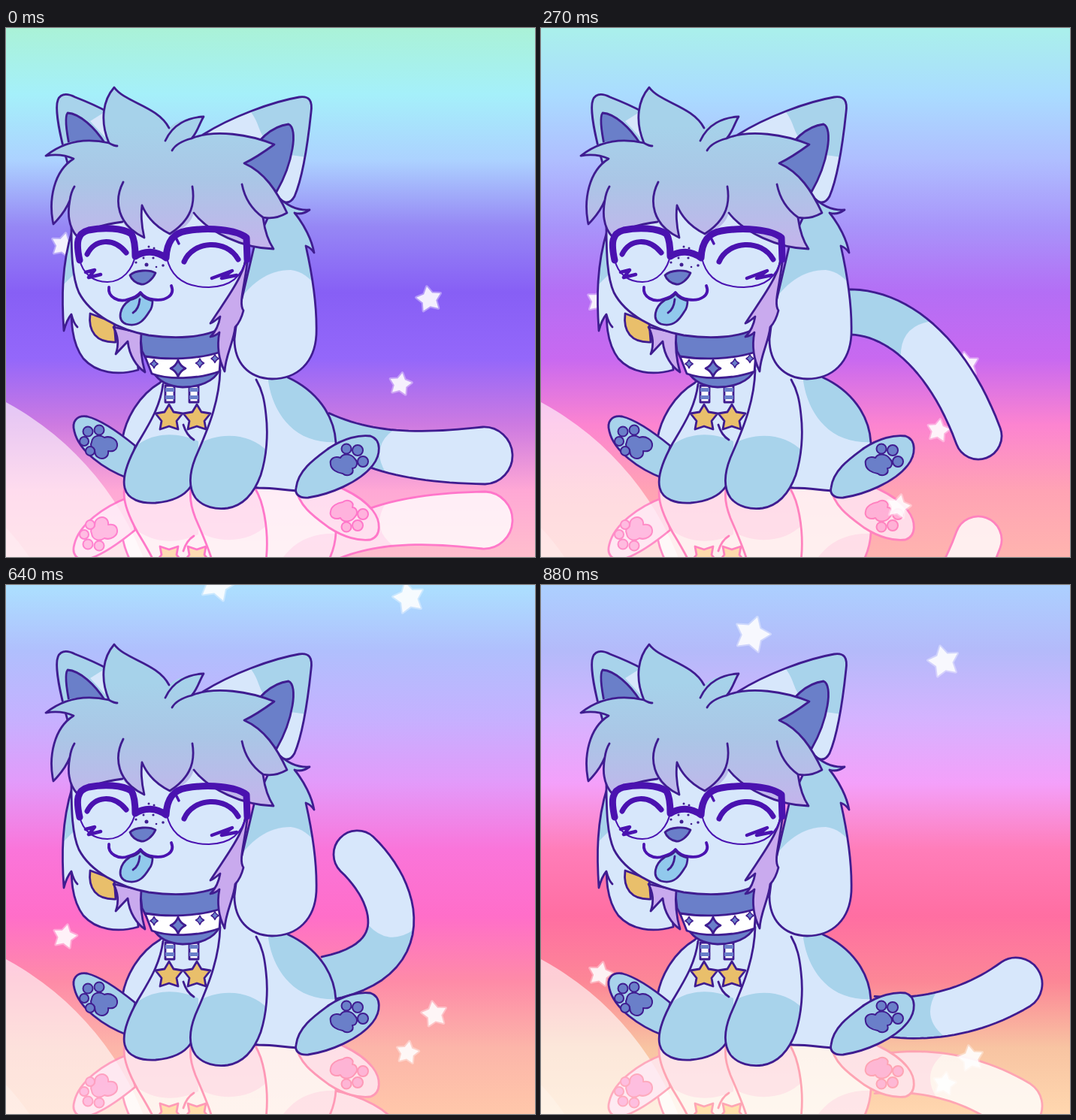
Animation, 704 px wide and 704 px high, one loop 910 ms. Source, as an HTML page:

```html
<!DOCTYPE html>
<html lang="en">
<head>
<meta charset="utf-8">
<title>Wagging tail</title>
<style>
  html, body { margin: 0; width: 100%; height: 100%; overflow: hidden; }
  svg { display: block; width: 100vw; height: 100vh; }
  #scene { --line: #3f1c90; --light: #d7e7fb; --mid: #a8d3eb; --dark: #6a7fc9; --gold: #e9bf6b; }
  #mirror { --light: #fff; --mid: #ffeaf7; --dark: #ffb3e0; --gold: #ffe5ad; opacity: .8; }
  .l { fill: var(--light); } .m { fill: var(--mid); } .d { fill: var(--dark); } .g { fill: var(--gold); }
  .n { fill: none; } .h { fill: url(#hairTone); } .p { fill: #c9aaee; } .w { fill: #fff; }
  .o { stroke: var(--line); stroke-width: 2.8; stroke-linejoin: round; stroke-linecap: round; }
  .b { fill: none; stroke: #4a12b0; stroke-linecap: round; stroke-linejoin: round; }
  .star { fill: #fff; stroke: #fff; stroke-opacity: .4; stroke-width: 4; stroke-linejoin: round; opacity: .9; }
</style>
</head>
<body>
<svg id="scene" viewBox="0 0 704 704" preserveAspectRatio="none">
  <defs>
    <linearGradient id="sky" x2="0" y2="1"></linearGradient>
    <linearGradient id="hairTone" gradientUnits="userSpaceOnUse" x1="0" y1="130" x2="0" y2="292">
      <stop stop-color="#a6d2ea"/><stop offset=".45" stop-color="#aac6e6"/><stop offset="1" stop-color="#c4b4ec"/>
    </linearGradient>
    <path id="torso" d="M205 472C178 488 160 518 155 546L180 600L336 612C360 612 375 616 392 616C425 602 440 582 439 552C437 514 412 482 375 465L340 415H250Z"/>
    <path id="legL" d="M209 474C205 505 190 528 175 553C160 580 155 600 158 612C162 628 180 633 199 632C222 630 238 622 246 610L276 520L270 474Z"/>
    <path id="legR" d="M285 455C284 500 266 540 252 572C243 595 243 612 252 625C262 638 280 641 295 639C318 635 331 617 339 595C347 570 349 540 346 515C344 495 341 482 333 468Z"/>
    <path id="flop" d="M330 292L362 224C375 238 390 243 404 242C397 247 390 248 384 246C397 262 407 282 410 299C406 293 402 291 399 290C408 330 414 375 413 408C411 445 388 467 354 467C322 466 304 445 304 414C306 395 310 375 314 360Z"/>
    <path id="catR" d="M262 142C300 118 355 98 390 92C404 90 408 97 406 112C402 150 396 196 384 224C376 238 366 232 358 218L310 180Z"/>
    <clipPath id="inTorso"><use href="#torso"/></clipPath>
    <clipPath id="inLegL"><use href="#legL"/></clipPath>
    <clipPath id="inLegR"><use href="#legR"/></clipPath>
    <clipPath id="inFlop"><use href="#flop"/></clipPath>
    <clipPath id="inCatR"><use href="#catR"/></clipPath>
    <path id="charm" d="M0-17L6-7L18-5L10 5L12 16L0 12L-12 16L-10 5L-18-5L-6-7Z" class="g o"/>
    <path id="spark" d="M0-11Q3-3 10 0Q3 3 0 11Q-3 3-10 0Q-3-3 0-11Z" class="d o"/>
    <g id="strap"><path class="w o" d="M-6-40H6V-18H-6Z"/><path class="d" d="M-6-37H6V-32H-6ZM-6-27H6V-22H-6Z"/></g>
  </defs>

  <rect width="704" height="704" fill="url(#sky)"/>
  <g fill="#fff"><circle cx="-190" cy="850" r="400" opacity=".6"/><circle cx="-190" cy="850" r="265" opacity=".22"/></g>

  <g id="mirror" transform="matrix(1 0 0 -1 0 1224)"><use href="#tail"/><use href="#body"/></g>
  <g id="stars"></g>

  <g id="tail"><path id="tailBase" class="m"/><path id="tailTip" class="l"/><path id="tailLine" class="n o"/></g>

  <g id="body">
    <use href="#torso" class="l"/>
    <path class="m" clip-path="url(#inTorso)" d="M348 460C350 488 360 512 377 529C393 546 418 553 445 551V440Z"/>
    <use href="#torso" class="n o"/>
    <path class="m o" d="M172 556C150 538 128 522 108 517C94 515 87 524 91 537C97 563 130 587 162 599Z"/>
    <path class="m o" d="M386 612C389 588 411 573 430 559C450 546 470 541 485 543C500 548 499 568 488 582C470 605 430 621 402 625C390 626 384 620 386 612Z"/>
    <g class="d o" style="stroke-width:2">
      <path d="M114 551C115 543 124 540 131 545C139 542 149 548 148 556C147 563 141 564 136 563C137 571 129 576 122 571C116 567 120 563 117 560C113 558 112 555 114 551Z"/>
      <circle cx="109" cy="537" r="6.500"/><circle cx="124" cy="535" r="6.500"/><circle cx="104" cy="550" r="6"/><circle cx="112" cy="563" r="6"/>
      <path d="M432 581C430 573 438 569 445 572C449 565 460 567 464 573C470 579 466 586 461 586C464 594 454 598 448 593C441 592 433 588 432 581Z"/>
      <circle cx="453" cy="560" r="6.500"/><circle cx="468" cy="562" r="7"/><circle cx="475" cy="577" r="7"/>
    </g>
    <use href="#legL" class="l"/>
    <path class="m" clip-path="url(#inLegL)" d="M150 590C165 545 212 530 256 550V650H150Z"/>
    <path class="n o" d="M209 474C205 505 190 528 175 553C160 580 155 600 158 612C162 628 180 633 199 632C222 630 238 622 246 610M236 528C239 538 245 545 250 548"/>
    <use href="#strap" x="218" y="516"/><use href="#strap" x="250" y="516"/>
    <use href="#charm" x="217" y="518"/><use href="#charm" x="254" y="518"/>
    <use href="#legR" class="l"/>
    <path class="m" clip-path="url(#inLegR)" d="M240 566C270 535 325 535 350 566V650H240Z"/>
    <path class="n o" d="M285 455C284 500 266 540 252 572C243 595 243 612 252 625C262 638 280 641 295 639C318 635 331 617 339 595C347 570 349 540 346 515C344 495 341 482 333 468"/>
  </g>

  <g id="head">
    <path class="l o" d="M88 340C85 395 88 420 103 440C120 459 148 463 176 455L170 380Z"/>
    <path class="g o" d="M112 380C109 404 120 419 146 418L144 392Z"/>
    <path class="l" d="M88 270C74 315 74 360 77 403C79 395 82 387 87 381C89 389 91 394 95 398C94 385 98 376 104 366Z"/>
    <path class="m" d="M88 270C79 298 76 320 76 342L92 326Z"/>
    <path class="n o" d="M88 270C74 315 74 360 77 403C79 395 82 387 87 381C89 389 91 394 95 398"/>

    <path class="d o" d="M178 403L284 400C287 420 288 440 284 455C277 471 256 478 235 478C215 477 203 470 196 458L181 430Z"/>
    <path class="w o" d="M185 437C215 442 255 441 286 431L284 457C255 468 215 468 194 460Z"/>
    <use href="#spark" x="229" y="453"/>
    <g transform="translate(197 447) scale(.52)"><use href="#spark"/></g>
    <g transform="translate(258 446) scale(.55)"><use href="#spark"/></g>
    <g transform="translate(278 440) scale(.5)"><use href="#spark"/></g>

    <use href="#flop" class="m"/>
    <path class="l" clip-path="url(#inFlop)" d="M296 390C315 345 345 322 379 322C396 324 408 336 420 352V480H296Z"/>
    <use href="#flop" class="n o"/>
    <path class="p o" d="M143 398C150 411 150 423 146 434L162 417C164 436 174 451 185 458C181 444 178 426 180 406Z"/>
    <path class="l o" d="M87 262C87 300 88 332 97 352C112 381 150 402 190 409C226 414 262 412 283 401C306 370 318 330 321 285L300 230H110Z"/>
    <path class="p o" d="M323 290C318 330 300 350 272 393C277 391 280 388 285 384C283 397 278 405 272 411C277 410 281 408 284 405C280 426 284 443 291 457C292 436 303 418 305 398C310 393 314 384 316 376C308 365 321 335 323 290Z"/>

    <path class="m o" d="M82 180C74 152 66 116 68 100C70 87 80 86 92 92C110 99 125 106 136 112L140 158Z"/>
    <path class="l" d="M112 124L131 112L138 152Z"/>
    <path class="d o" d="M85 160C80 136 78 118 82 113C98 114 118 132 132 154Z"/>
    <use href="#catR" class="l"/>
    <path class="m" clip-path="url(#inCatR)" d="M326 112C338 128 335 138 348 152L372 168L400 172L420 80H350Z"/>
    <use href="#catR" class="n o"/>
    <path class="d o" d="M317 180C333 150 352 131 376 128C389 133 382 180 360 218Z"/>

    <path class="h" d="M63 261C56 228 64 190 90 174C77 168 65 168 53 170C67 158 81 151 96 150C111 149 124 151 137 153C124 122 130 95 144 79C158 99 202 104 217 133C227 123 243 119 263 118C257 128 255 138 247 147C278 134 325 142 357 155C342 166 330 174 317 180C344 192 360 216 374 246C362 253 352 254 342 252C344 268 348 282 356 294C315 293 270 272 250 246C246 260 236 268 218 274C202 266 188 253 181 236C179 252 181 266 184 279C170 274 161 267 155 258C140 260 112 265 95 278C85 267 81 250 85 229C80 242 72 252 63 261Z"/>
    <path class="n o" d="M137 153C124 122 130 95 144 79C158 99 202 104 217 133M137 153C142 156 145 157 148 157M247 147C235 150 225 156 221 163M212 150C222 128 242 119 263 118C257 128 255 138 247 147C278 134 325 142 357 155C342 166 330 174 317 180C344 192 360 216 374 246C362 253 352 254 342 252C328 242 318 228 314 208M342 252C344 268 348 282 356 294C315 293 270 272 250 246M137 153C111 147 81 148 53 170C65 168 77 168 90 174C64 190 56 228 63 261C72 252 80 242 85 229C81 250 85 267 95 278C112 265 140 260 155 258M156 205C143 230 148 262 184 279C181 266 179 252 181 236C188 253 202 266 218 274C241 259 253 240 248 211M85 229C86 222 88 216 91 211"/>

    <g class="b">
      <path stroke-width="9" d="M98 309C93 286 94 273 110 269C130 265 155 266 167 274C171 281 172 291 172 304C184 296 200 296 213 306C214 285 222 273 240 270C270 265 306 268 320 279L321 308"/>
      <path stroke-width="2" d="M98 308C102 327 116 338 135 338C155 338 169 321 172 302M214 306C220 333 240 345 270 345C299 344 314 332 321 304"/>
      <path stroke-width="7" d="M108 301C118 281 143 278 160 299M237 311C249 283 293 280 309 308"/>
      <path stroke-width="4.500" d="M106 325L118 322L110 332L126 328M274 333L301 323L287 333L307 329"/>
      <path stroke-width="3.500" d="M227 281L230 287"/>
      <path stroke-width="3.800" d="M137 345C135 358 150 366 163 361C171 359 176 356 179 352C186 362 206 365 216 358C222 354 222 348 220 343"/>
    </g>
    <g fill="#401f92">
      <circle cx="190" cy="291" r="1.500"/><circle cx="197" cy="293" r="1.500"/><circle cx="183" cy="306" r="1.500"/><circle cx="196" cy="306" r="1.600"/>
      <circle cx="187" cy="315" r="2.500"/><circle cx="209" cy="316" r="1.800"/><circle cx="173" cy="312" r="1.600"/><circle cx="200" cy="318" r="1.300"/>
    </g>
    <path class="d o" d="M165 329C172 322 191 321 199 326C195 335 186 342 180 341C173 340 167 335 165 329Z"/>
    <path class="o" fill="#91c9ec" d="M165 362C151 371 147 389 160 394C178 399 186 385 191 377C195 372 195 367 195 363C188 362 183 359 179 354C175 359 170 361 165 362Z"/>
    <path class="n o" d="M178 361C177 371 174 376 169 379"/>
  </g>
</svg>
<script>
const FRAMES = 27, LAST = FRAMES - 1, STEP = 910 / FRAMES;
const $ = id => document.getElementById(id);
const make = (tag, parent, attrs) => {
  const el = document.createElementNS('http://www.w3.org/2000/svg', tag);
  for (const k in attrs) el.setAttribute(k, attrs[k]);
  return parent.appendChild(el);
};
const mix = (a, b, u) => a + (b - a) * u;

// Steps at which the tail poses are reached, and how far the sky has drifted by then
const beats = [0, 5, 8, 11, 15, 21, 26];
const drift = [0, .235, .325, .46, .6, .872, 1];
const segment = (list, t) => Math.max(0, list.findLastIndex((v, i) => i < list.length - 1 && t >= v));

function driftAt(t) {
  const k = segment(beats, t);
  return mix(drift[k], drift[k + 1], (t - beats[k]) / (beats[k + 1] - beats[k]));
}

// Sky colours from top to bottom at four moments
const skyMarks = [0, .325, .6, 1];
const skies = [
  'aaf2d7 a5f0fa acd2ff 9687f5 875ff5 9467fa cd7ae1 ffa8d5 ffbecd',
  'aaf0eb aadcff afbeff a894fa b46ef5 c869f0 fc84d0 ffa3b4 ffb4af',
  'aceeff acc4ff b8b0ff d495fa f66ef5 ff6eea ff8eb6 ffa8af ffb9a5',
  'acd0ff b4bafa d4b3ff f4a0fa ff7db9 ff6ea2 fc8796 f8c4a2 ffd7af'
].map(row => row.split(' ').map(c => [0, 2, 4].map(i => parseInt(c.slice(i, i + 2), 16))));
const stops = skies[0].map((c, i) => make('stop', $('sky'), { offset: i / 8 }));
const blend = (a, b, u) => `rgb(${a.map((v, i) => Math.round(mix(v, b[i], u)))})`;

function drawSky(p) {
  const k = segment(skyMarks, p);
  const u = (p - skyMarks[k]) / (skyMarks[k + 1] - skyMarks[k]);
  stops.forEach((s, i) => s.setAttribute('stop-color', blend(skies[k][i], skies[k + 1][i], u)));
  $('mirror').style.setProperty('--line', blend([255, 105, 200], [255, 155, 182], p));
}

// Falling stars: start x, y, end x, y, radius, tilt
const stars = [
  [76, 289, 79, 518, 16, -1.35], [563, 361, 572, 630, 17, -1.75], [525, 474, 537, 664, 15, -1.4],
  [470, 561, 488, 795, 16, -1.35], [281, -245, 281, 66, 24, -1.28], [536, -285, 536, 102, 21, -1.8]
].map(s => ({ s, el: make('path', $('stars'), { class: 'star', d: starPath(s[4], s[5]) }) }));

function starPath(r, tilt) {
  const pts = Array.from({ length: 10 }, (_, i) => {
    const a = i * Math.PI / 5 + tilt, q = i % 2 ? r * .55 : r;
    return [q * Math.cos(a), q * Math.sin(a)].map(v => v.toFixed(1));
  });
  return 'M' + pts.join('L') + 'Z';
}
function drawStars(p) {
  for (const { s, el } of stars)
    el.setAttribute('transform', `translate(${mix(s[0], s[2], p)} ${mix(s[1], s[3], p)})`);
}

// Tail poses: four curve points, then half widths at base and tip
const poses = [
  [420, 530, 480, 564, 540, 573, 636, 569, 20, 38],
  [400, 506, 470, 500, 542, 521, 613, 564, 30, 30],
  [405, 378, 470, 375, 540, 430, 582, 543, 30, 31],
  [385, 470, 385, 420, 365, 335, 423, 333, 28, 28],
  [390, 490, 460, 465, 460, 370, 385, 338, 31, 31],
  [440, 540, 570, 520, 545, 440, 517, 383, 28, 32],
  [440, 572, 500, 582, 570, 572, 632, 531, 25, 35]
];
const N = poses.length;
const beatAt = i => beats[(i + N) % N] + Math.floor(i / N) * FRAMES;
const poseAt = i => poses[(i + N) % N];

// Smooth cyclic curve through the poses
function tailPose(t) {
  const k = t < LAST ? segment(beats, t) : N - 1;
  const span = beatAt(k + 1) - beatAt(k), u = (t - beatAt(k)) / span;
  const slope = (i, j) => (poseAt(i + 1)[j] - poseAt(i - 1)[j]) / (beatAt(i + 1) - beatAt(i - 1)) * span;
  const u2 = u * u, u3 = u2 * u;
  return poseAt(k).map((a, j) =>
    (2 * u3 - 3 * u2 + 1) * a + (u3 - 2 * u2 + u) * slope(k, j) +
    (3 * u2 - 2 * u3) * poseAt(k + 1)[j] + (u3 - u2) * slope(k + 1, j));
}

function drawTail(t) {
  const [ax, ay, bx, by, cx, cy, dx, dy, w0, w1] = tailPose(t);
  const fix = (x, y) => x.toFixed(1) + ' ' + y.toFixed(1);
  const spot = s => {
    const r = 1 - s, cubic = (a, b, c, d) => r * r * r * a + 3 * r * r * s * b + 3 * r * s * s * c + s * s * s * d;
    const vel = (a, b, c, d) => r * r * (b - a) + 2 * r * s * (c - b) + s * s * (d - c);
    const vx = vel(ax, bx, cx, dx), vy = vel(ay, by, cy, dy), len = Math.hypot(vx, vy) || 1;
    return { x: cubic(ax, bx, cx, dx), y: cubic(ay, by, cy, dy), ux: vx / len, uy: vy / len, w: mix(w0, w1, s) };
  };
  const side = (p, k) => fix(p.x - p.uy * p.w * k, p.y + p.ux * p.w * k);
  const outline = from => {
    const pts = Array.from({ length: 25 }, (_, i) => spot(mix(from, 1, i / 24)));
    const left = pts.map(p => side(p, -1)), right = pts.map(p => side(p, 1)).reverse();
    return `M${left.join('L')}A${w1} ${w1} 0 0 1 ${right.join('L')}`;
  };
  const whole = outline(0), tipFrom = .48, m = spot(tipFrom);
  $('tailBase').setAttribute('d', whole + 'Z');
  $('tailLine').setAttribute('d', whole);
  $('tailTip').setAttribute('d',
    `${outline(tipFrom)}Q${fix(m.x - m.ux * 26, m.y - m.uy * 26)} ${side(m, -1)}Z`);
}

function draw(now) {
  const t = Math.floor((now + 4) / STEP) % FRAMES, p = driftAt(t);
  drawSky(p);
  drawStars(p);
  drawTail(t);
}
const start = performance.now();
(function tick() {
  draw(performance.now() - start);
  requestAnimationFrame(tick);
})();
</script>
</body>
</html>
```
